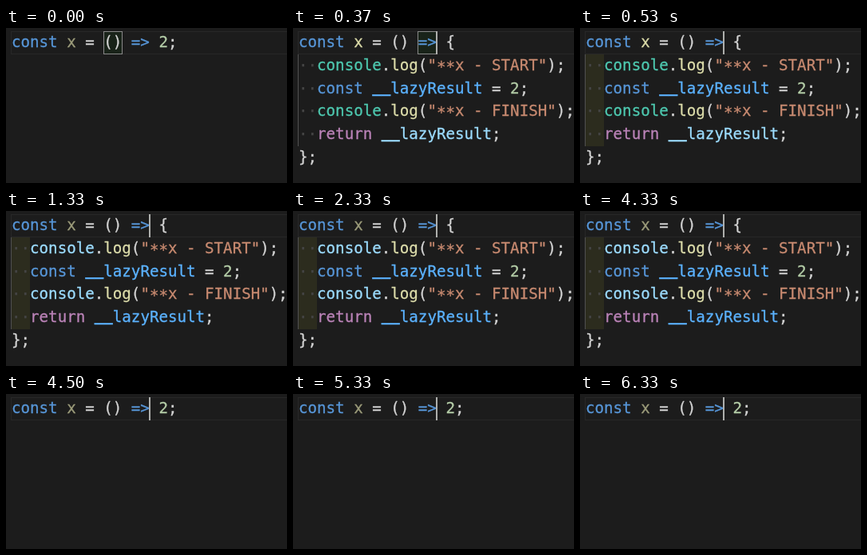
An HTML page for the animation above (6.36 s loop, 352 px wide and 194 px high).

```html
<!DOCTYPE html>
<html lang="en">
<head>
<meta charset="utf-8">
<style>
  html, body { margin: 0; width: 100%; height: 100%; overflow: hidden; background: #1c1c1c; }
  #editor { position: relative; width: 352px; height: 194px; overflow: hidden; }
  #editor > * { position: absolute; box-sizing: border-box; }
  pre { margin: 0; left: 7px; top: 4px; color: #d4d4d4; font: 19.15px/28.8px "DejaVu Sans Mono", monospace; font-variant-ligatures: none; -webkit-text-stroke: .3px; }
  #line { left: 6px; top: 4px; width: 360px; height: 29px; border: 1.5px solid #282828; }
  #indent { left: 7px; top: 33px; width: 23px; height: 115px; background: rgba(255, 255, 64, .07); }
  #guide { left: 6px; top: 33px; width: 1px; height: 115px; background: #505050; }
  #match { top: 4px; width: 24px; height: 29px; border: 1px solid #888; background: rgba(0, 100, 0, .1); }
  #cursor { left: 179px; top: 4px; width: 2px; height: 29px; background: #aeafad; }
  .kw { color: #5796d8; }
  .fn { color: #dcdcaa; }
  .num { color: #b5cea8; }
  .str { color: #c88a70; }
  .star { position: relative; top: 2px; }
  .under { position: relative; top: -2px; font-weight: bold; }
  .ret { color: #bb83b8; }
  .const { color: #5bb2ff; }
  .use { color: #9cdcfe; }
  .obj { color: #4ec9b0; }
  .dots { color: #454545; }
  .semantic .use { color: #5bb2ff; }
  .semantic .obj { color: #9cdcfe; }
</style>
</head>
<body>
<div id="editor">
  <div id="line"></div>
  <div id="indent"></div>
  <div id="guide"></div>
  <div id="match"></div>
  <pre id="short"></pre>
  <pre id="long"></pre>
  <div id="cursor"></div>
</div>
<script>
const LOOP = 6360;
const $ = id => document.getElementById(id);
const span = (type, text) => `<span class="${type}">${text}</span>`;
const show = (id, on) => { $(id).style.visibility = on ? "visible" : "hidden"; };

const dots = span("dots", "··");
const result = span("under", "__") + "lazyResult";
const head = `${span("kw", "const")} ${span("fn x", "x")} = () ${span("kw", "=&gt;")} `;
const log = word => dots + span("obj", "console") + "." + span("fn", "log") + "(" +
  span("str", `"${span("star", "**")}x - ${word}"`) + ");";

$("short").innerHTML = head + span("num", "2") + ";";
$("long").innerHTML = [
  head + "{",
  log("START"),
  `${dots}${span("kw", "const")} ${span("const", result)} = ${span("num", "2")};`,
  log("FINISH"),
  `${dots}${span("ret", "return")} ${span("use", result)};`,
  "};"
].join("\n");

const longName = document.querySelector("#long .x");
document.querySelector("#short .x").style.opacity = .667;

function draw(now) {
  const t = now % LOOP;
  const expanded = t >= 330 && t < 4500;
  show("short", !expanded);
  show("long", expanded);
  show("guide", expanded);
  show("indent", expanded && t >= 470);
  show("match", t < 430);
  $("match").style.left = (t < 300 ? 122 : 156) + "px";
  show("cursor", t >= 330 && Math.floor((t - 330) / 500) % 2 === 0);

  // Semantic colours arrive late, then the unused name dims
  $("long").className = t >= 670 ? "semantic" : "";
  const dim = Math.min(1, Math.max(0, (t - 800) / 200));
  longName.style.opacity = 1 - dim * .333;
}

const start = performance.now();
function tick() {
  draw(performance.now() - start);
  requestAnimationFrame(tick);
}
tick();
</script>
</body>
</html>
```
